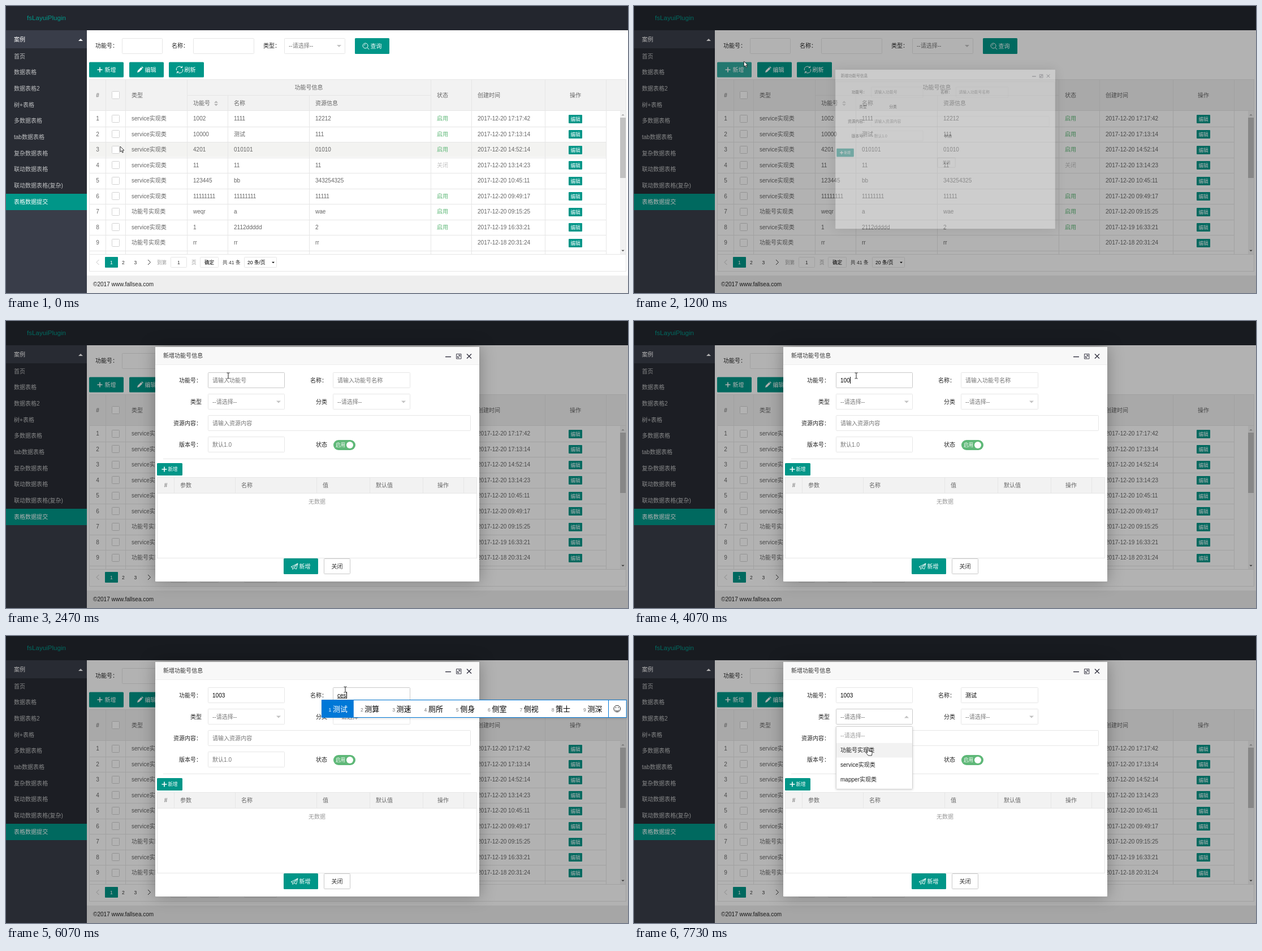
Write an HTML page that moves like this. It is 1100 px wide and 509 px high and loops after 8 s.

```html
<!DOCTYPE html>
<html lang="zh-CN">
<head>
<meta charset="utf-8">
<title>表格数据提交</title>
<style>
html, body { margin: 0; width: 100%; height: 100%; overflow: hidden; background: #fff; }
svg { display: block; width: 100%; height: 100%; }
text { font-family: "Liberation Sans", "Noto Sans CJK SC", "Noto Sans CJK", sans-serif; white-space: pre; }
.shadow { filter: drop-shadow(0 0 14px rgba(0, 0, 0, .3)); }
.lift { filter: drop-shadow(0 1px 2px rgba(0, 0, 0, .15)); }
</style>
</head>
<body>
<svg id="stage" viewBox="0 0 1100 509" preserveAspectRatio="none"></svg>
<script>
const LOOP = 8000, TEAL = '#009688', LINE = '#e6e6e6', HINT = '#757575', BASE = 10.04, SMALL = 8.6;

// ---- drawing helpers, all returning SVG markup ----
const text = (x, y, s, fill = '#666', size = BASE, anchor = 'start', extra = '') =>
  `<text x="${x}" y="${y + size * .36}" fill="${fill}" font-size="${size}" text-anchor="${anchor}" ${extra}>${s}</text>`;
const mid = (x, y, s, fill, size) => text(x, y, s, fill, size, 'middle');
const rect = (x, y, w, h, fill, r = 0, extra = '') =>
  `<rect x="${x}" y="${y}" width="${w}" height="${h}" rx="${r}" fill="${fill}" ${extra}/>`;
const box = (x, y, w, h, stroke = LINE, r = 1, extra = '') =>
  rect(x + .5, y + .5, w - 1, h - 1, '#fff', r, `stroke="${stroke}" ${extra}`);
const hline = (x1, x2, y, c = LINE) => rect(x1, y, x2 - x1, 1, c);
const vline = (x, y1, y2, c = LINE) => rect(x, y1, 1, y2 - y1, c);
const path = (d, stroke, width = 1, fill = 'none') =>
  `<path d="${d}" fill="${fill}" stroke="${stroke}" stroke-width="${width}"/>`;
const fillPath = (d, fill) => `<path d="${d}" fill="${fill}"/>`;
const group = (id, body, extra = '') => `<g id="${id}" ${extra}>${body}</g>`;
const down = (x, y, w = 4, c = '#c2c2c2') => fillPath(`M${x - w} ${y - w / 2}h${2 * w}l${-w} ${w}z`, c);
const up = (x, y, w = 4, c = '#c2c2c2') => fillPath(`M${x - w} ${y + w / 2}h${2 * w}l${-w} ${-w}z`, c);

const icons = {
  plus: (x, y, r = 4.5) => path(`M${x - r} ${y}h${2 * r}M${x} ${y - r}v${2 * r}`, '#fff', 1.6),
  pencil: (x, y) => fillPath(`M${x - 5} ${y + 5}l1-3.4 5.8-5.8 2.4 2.4-5.8 5.8zM${x + 2.5} ${y - 4.8}l1-1 2.4 2.4-1 1z`, '#fff'),
  refresh: (x, y) => path(`M${x - 5.5} ${y + 1}a5.5 5.5 0 0 1 9.5-5M${x + 5.5} ${y - 1}a5.5 5.5 0 0 1-9.5 5M${x + 1.5} ${y - 3.5}h3v-3M${x - 1.5} ${y + 3.5}h-3v3`, '#fff'),
  search: (x, y) => path(`M${x + 4} ${y - .5}a4.5 4.5 0 1 0-9 0a4.5 4.5 0 1 0 9 0M${x + 2.8} ${y + 2.8}l3.4 3.2M${x - 2.5} ${y - 1}a2.3 2.3 0 0 1 2-2`, '#fff'),
  plane: (x, y) => path(`M${x - 6} ${y + 1}l12-6-2.6 10-4-2-2.4 2.6-.4-3.4zM${x - 2.8} ${y + 2.2}l8.8-7.2-6.4 8`, '#fff', .9)
};
const button = (x, y, w, h, label, icon, size = BASE) =>
  rect(x, y, w, h, TEAL, 1.5) + icons[icon](x + (size < BASE ? 13 : 19), y + h / 2) +
  text(x + (size < BASE ? 19.5 : 27.5), y + h / 2, label, '#fff', size);

// ---- page behind the dialog ----
function sidebar() {
  const items = ['首页', '数据表格', '数据表格2', '树+表格', '多数据表格', 'tab数据表格', '复杂数据表格',
    '联动数据表格', '联动数据表格(复杂)', '表格数据提交'];
  return rect(0, 0, 1100, 43, '#23262e') + text(37, 21, 'fsLayuiPlugin', TEAL, 11.6) +
    rect(0, 43, 143, 466, '#393d49') + rect(0, 75, 143, 258, '#282b33') + rect(0, 333, 143, 29, TEAL) +
    text(14, 59, '案例', '#fff') + up(132, 60, 4, '#fff') +
    items.map((s, i) => text(14, 89 + i * 28.67, s, i === 9 ? '#fff' : '#bfc0c2')).join('');
}

function searchBar() {
  return text(158, 70, '功能号：', '#222') + text(293, 70, '名称：', '#222') + text(455, 70, '类型：', '#222') +
    box(205, 57, 72, 28) + box(331, 57, 108, 28) + box(492, 57, 108, 28) +
    text(500, 70.5, '--请选择--', HINT) + down(589, 71) +
    button(617, 57, 61, 28, '查询', 'search') +
    group('addButton', button(147, 99.5, 61, 27, '新增', 'plus')) +
    button(218, 99.5, 61, 27, '编辑', 'pencil') + button(288, 99.5, 62, 27, '刷新', 'refresh');
}

const ROW = 27.5, TOP = 186;
const service = 'service实现类', feature = '功能号实现类';
const rows = [
  [service, '1002', '1111', '12212', '启用', '20 17:17:42'],
  [service, '10000', '测试', '111', '启用', '20 17:13:14'],
  [service, '4201', '010101', '01010', '启用', '20 14:52:14'],
  [service, '11', '11', '11', '关闭', '20 13:14:23'],
  [service, '123445', 'bb', '343254325', '', '20 10:45:11'],
  [service, '11111111', '11111111', '11111', '启用', '20 09:49:17'],
  [feature, 'weqr', 'a', 'wae', '启用', '20 09:15:25'],
  [service, '1', '2112ddddd', '2', '启用', '19 16:33:21'],
  [feature, 'rr', 'rr', 'rr', '', '18 20:31:24']
];

function table() {
  const head = rect(147, 130, 950, 56, '#f2f2f2') + mid(162, 158, '#') + box(187, 151, 14, 14, '#d2d2d2') +
    text(222, 158, '类型') + mid(535.5, 144, '功能号信息') + text(331, 172, '功能号') +
    up(371.5, 170, 3.5, '#b2b2b2') + down(371.5, 175.5, 3.5, '#b2b2b2') +
    text(403, 172, '名称') + text(547, 172, '资源信息') + text(762, 158, '状态') +
    text(834, 158, '创建时间') + mid(1007, 158, '操作');
  const body = rows.map(([type, code, name, source, state, date], i) => {
    const y = TOP + ROW * (i + .5);
    return mid(162, y, i + 1) + box(187, Math.round(y - 7), 14, 14, '#d2d2d2') +
      text(222, y, type) + text(331, y, code) + text(403, y, name) + text(547, y, source) +
      text(762, y, state, state === '启用' ? '#5fb878' : '#c2c2c2') + text(834, y, '2017-12-' + date) +
      rect(995, Math.round(y - 7), 24, 15, TEAL, 1) + mid(1007, y + .7, '编辑', '#fff', SMALL) +
      hline(147, 1061, Math.round(TOP + ROW * (i + 1)));
  }).join('');
  const columns = [176, 211, 320, 751, 823, 953, 1061].map(x => vline(x, 130, 440)).join('') +
    vline(392, 158, 440) + vline(536, 158, 440);
  const scrollbar = rect(1086, 186, 10, 254, '#f1f1f1') + rect(1086, 198, 10, 107, '#c1c1c1') +
    up(1091, 193, 2.6, '#a3a3a3') + down(1091, 434, 2.6, '#505050');
  return head + rect(147, 0, 914, 27, '#f3f3f1', 0, 'id="rowHover"') + body + columns +
    hline(320, 751, 158) + hline(147, 1097, 130) + hline(147, 1097, 185) + scrollbar +
    hline(147, 1097, 440) + hline(147, 1097, 470) + vline(147, 130, 470) + vline(1096, 130, 470);
}

function pager() {
  const y = 454.5, label = (x, s, c = '#333') => text(x, y, s, c, SMALL);
  return path('M164.5 450l-4.5 4.5 4.5 4.5', '#c2c2c2') + rect(175, 445, 23, 19, TEAL, 1) +
    mid(186.5, y, 1, '#fff', SMALL) + mid(207.5, y, 2, '#333', SMALL) + mid(229, y, 3, '#333', SMALL) +
    path('M251 450l4.5 4.5-4.5 4.5', '#333') + label(267, '到第', '#999') + box(291, 445, 29, 19) +
    mid(305.5, y, 1, '#333', SMALL) + label(328, '页', '#999') + box(343, 445, 33, 19) +
    label(351, '确定', '#000') + label(383, '共 41 条') + box(421, 445, 58, 19) +
    label(427, '20 条/页', '#000') + down(472.5, 455, 2.4, '#000') +
    rect(143, 478, 957, 31, '#eee') + text(154, 493, '©2017 www.fallsea.com', '#222');
}

// ---- dialog ----
function dialog() {
  const field = (id, x, y, w) => box(x, y, w, 28, LINE, 1, `id="${id}"`);
  const frame = rect(264, 46, 573, 416, '#fff', 1, 'class="shadow"') + rect(264, 46, 573, 31, '#f8f8f8') +
    hline(264, 837, 77, '#eee') + text(278, 61, '新增功能号信息', '#333') +
    path('M777 63.5h10', '#2e2d3c', 1.4) +
    path('M796.5 58.5h8.5v8.5h-8.5zM798.5 65l4.5-4.5M800 60.5h3v3M798.5 62v3h3', '#2e2d3c', .9) +
    path('M815 58.5l8 8m0-8l-8 8', '#2e2d3c', 1.3);
  const form = text(306, 105, '功能号：', '#222') + field('codeBox', 357, 91, 136) +
    text(365, 105, '请输入功能号', HINT, BASE, 'start', 'id="codeText"') +
    text(538, 105, '名称：', '#222') + field('nameBox', 578, 91, 137) +
    text(586, 105, '请输入功能号名称', HINT, BASE, 'start', 'id="nameText"') +
    text(326, 143, '类型', '#222') + text(296, 181, '资源内容：', '#222') + field('sourceBox', 357, 167, 465) +
    text(365, 181, '请输入资源内容', HINT) + text(306, 219, '版本号：', '#222') + field('versionBox', 357, 205, 136) +
    text(365, 219, '默认1.0', HINT) + text(548, 219, '状态', '#222') +
    button(267, 252, 45, 22, '新增', 'plus', SMALL);
  const early = text(404, 143, '分类', '#222') + box(530, 276, 47, 26, '#c9c9c9') + mid(553.5, 288, '关闭', '#333');
  const columns = [[308, '参数'], [416, '名称'], [560, '值'], [654, '默认值'], [763, '操作']];
  const late = field('typeBox', 357, 129, 136) + text(365, 143, '--请选择--', HINT) +
    group('arrowDown', down(482, 143.5)) + group('arrowUp', up(482, 143.5)) +
    text(548, 143, '分类', '#222') + field('kindBox', 578, 129, 137) + text(586, 143, '--请选择--', HINT) + down(703, 143.5) +
    rect(579, 211, 39, 18, '#5fb878', 9) + text(583, 220, '启用', '#fff', SMALL) +
    '<circle cx="608" cy="220" r="6" fill="#fff"/>' + hline(278, 822, 244) +
    rect(267, 277, 566, 28, '#f2f2f2') + hline(267, 833, 277) + hline(267, 833, 305) + hline(267, 833, 420) +
    vline(267, 277, 420) + vline(832, 277, 420) +
    [297, 405, 549, 643, 737, 809].map(x => vline(x, 277, 305)).join('') +
    mid(282.5, 291, '#') + columns.map(([x, s]) => text(x, 291, s)).join('') + mid(550, 320, '无数据', '#999') +
    button(491, 421, 61, 28, '新增', 'plane') + box(562, 421, 47, 28, '#c9c9c9') + mid(585.5, 435, '关闭', '#333');
  return frame + form + group('early', early) + group('late', late);
}

function dropdown() {
  return box(357, 160, 136, 112, '#d2d2d2', 1, 'class="lift"') +
    rect(358, 190, 134, 25.8, '#f2f2f2', 0, 'id="optionHover"') +
    ['--请选择--', feature, service, 'mapper实现类']
      .map((s, i) => text(365, 176.5 + i * 25.8, s, i ? '#222' : '#999')).join('');
}

// ---- pinyin candidate bars ----
const candidateBars = [
  { from: 5330, to: 5870, x: 588, cell: 43.6, words: '从 出 才 吃 成 车 次 操 长' },
  { from: 5870, to: 6070, x: 593, cell: 43.6, words: '册 测 侧 策 厕 恻 测 冊 側' },
  { from: 6070, to: 6400, x: 558, cell: 56.3, words: '测试 测算 测速 厕所 侧身 侧室 侧视 策士 测深' }
];
function candidateBar({ x, cell, words }, i) {
  const end = x + cell * 9;
  return group('bar' + i, rect(x + .5, 113.5, cell * 9 + 32, 31, '#fff', 0, 'stroke="#0078d7" class="lift"') +
    rect(x, 113, cell + .5, 32, '#0078d7') +
    words.split(' ').map((w, n) => mid(x + 15 + n * cell, 131, n + 1, n ? '#777' : '#fff', SMALL) +
      text(x + 20 + n * cell, 129.5, w, n ? '#000' : '#fff', 13)).join('') +
    vline(Math.round(end), 114, 144, '#0078d7') +
    `<circle cx="${end + 16}" cy="129" r="5.8" fill="none" stroke="#222"/>` +
    path(`M${end + 13} 131a3.2 3.2 0 0 0 6 0M${end + 13.8} 126v2M${end + 18.2} 126v2`, '#222'));
}

const pointers =
  group('arrow', path('M0 0v9.6l2.3-2 1.5 3.5 1.6-.7-1.5-3.4h3z', '#222', .9, '#fff')) +
  group('beam', path('M-2.5-5h2l.5.5.5-.5h2M0-4.5v9M-2.5 5h2l.5-.5.5.5h2', '#222')) +
  group('hand', path('M-1.2 8V.4a1.2 1.2 0 0 1 2.4 0V5l5 1.2q1.2.4 1 2L6.4 13H.4L-3.8 8q.6-1.6 2.6 0', '#222', .9, '#fff'));

const stage = document.getElementById('stage');
stage.innerHTML = rect(0, 0, 1100, 509, '#fff') + sidebar() + searchBar() + table() + pager() +
  rect(0, 0, 1100, 509, '#000', 0, 'id="shade" opacity=".3"') + group('dialog', dialog()) +
  rect(0, 99, 1, 12, '#000', 0, 'id="caret"') + group('dropdown', dropdown()) +
  candidateBars.map(candidateBar).join('') + group('pointer', pointers);

// ---- motion ----
const el = id => document.getElementById(id);
const set = (id, name, value) => el(id).setAttribute(name, value);
const show = (id, on) => set(id, 'display', on ? 'inline' : 'none');
const clamp = v => Math.max(0, Math.min(1, v));

// CSS "ease": cubic-bezier(.25, .1, .25, 1)
function ease(x) {
  x = clamp(x);
  const curve = (s, a, b) => 3 * s * (1 - s) ** 2 * a + 3 * s * s * (1 - s) * b + s ** 3;
  let lo = 0, hi = 1;
  for (let i = 0; i < 20; i++) {
    const s = (lo + hi) / 2;
    if (curve(s, .25, .25) < x) lo = s; else hi = s;
  }
  return curve(lo, .1, 1);
}

const mouse = [[0, 202, 249], [70, 202, 249], [250, 199, 228], [500, 190, 150], [720, 184, 85], [870, 181, 103],
  [1050, 181, 103], [1130, 184, 96], [1200, 194, 98], [1800, 393, 97], [4400, 393, 97], [5000, 600, 95],
  [6330, 600, 95], [7000, 424, 158], [7200, 412, 146], [7300, 412, 146], [7730, 414, 199], [LOOP, 414, 199]];
function mouseAt(t) {
  const i = mouse.findIndex(k => k[0] > t), [t0, x0, y0] = mouse[i - 1], [t1, x1, y1] = mouse[i];
  const p = (t - t0) / (t1 - t0);
  return [x0 + (x1 - x0) * p, y0 + (y1 - y0) * p];
}

const keys = [[1930, 'code', ''], [2600, 'code', '1'], [2800, 'code', '10'], [3000, 'code', '100'], [4130, 'code', '1003'],
  [5200, 'name', ''], [5330, 'name', 'c'], [5870, 'name', 'ce'], [6070, 'name', 'ces'], [6400, 'name', '测试'], [6500, 'name', '测试']];
const hints = { code: '请输入功能号', name: '请输入功能号名称' };
const OPEN = 1133, SELECT = 7300;

function typing(t) {
  const done = keys.filter(k => k[0] <= t), last = done[done.length - 1];
  for (const field of ['code', 'name']) {
    const entry = done.filter(k => k[1] === field).pop(), value = entry ? entry[2] : '';
    el(field + 'Text').textContent = value || hints[field];
    set(field + 'Text', 'fill', value ? '#000' : HINT);
    set(field + 'Text', 'text-decoration', field === 'name' && /^[a-z]+$/.test(value) ? 'underline' : 'none');
  }
  show('caret', last && t < SELECT && (t - last[0]) % 1060 < 530);
  if (last) {
    const width = last[2] ? el(last[1] + 'Text').getComputedTextLength() : 0;
    set('caret', 'x', Math.round((last[1] === 'code' ? 365 : 586) + width));
  }
  return last && t < SELECT ? last[1] : '';
}

function render(t) {
  const [x, y] = mouseAt(t), row = Math.floor((y - TOP) / ROW);
  show('rowHover', t < OPEN && row >= 0);
  set('rowHover', 'y', TOP + ROW * row);
  set('addButton', 'opacity', 1 - .2 * ease((t - 880) / 300) + .2 * ease((t - 1250) / 300));

  const p = ease((t - OPEN) / 300), k = .5 + p / 2;
  show('shade', t >= OPEN);
  show('dialog', t >= OPEN);
  set('dialog', 'opacity', p);
  set('dialog', 'transform', `translate(550.5 254) scale(${k}) translate(-550.5 -254)`);
  show('early', t < 1300);
  show('late', t >= 1300);

  const focus = typing(t), open = t >= SELECT;
  const inside = (left, right) => x > left && x < right && y > 91 && y < 119;
  const overCode = inside(357, 493), overName = inside(578, 715);
  const border = (id, on) => set(id, 'stroke', on ? '#c9c9c9' : LINE);
  border('codeBox', focus === 'code' || overCode);
  border('nameBox', focus === 'name' || overName);
  border('sourceBox', Math.abs(t - 7000) < 120);
  border('typeBox', t > 7100);
  show('arrowDown', !open);
  show('arrowUp', open);

  const q = ease((t - SELECT) / 300), option = Math.floor((y - 164) / 25.8);
  show('dropdown', open);
  set('dropdown', 'opacity', .3 + .7 * q);
  set('dropdown', 'transform', `translate(0 ${21 * (1 - q)})`);
  show('optionHover', option >= 0);
  set('optionHover', 'y', 164 + 25.8 * option);

  candidateBars.forEach((b, i) => show('bar' + i, t >= b.from && t < b.to));

  const beam = t > 6900 && t < 7060 || t > 1250 && (overCode || overName);
  const shape = t >= 7060 ? 'hand' : beam ? 'beam' : 'arrow';
  ['arrow', 'beam', 'hand'].forEach(s => show(s, s === shape));
  set('pointer', 'transform', `translate(${x} ${y})`);
}

const start = performance.now();
function tick() {
  render((performance.now() - start) % LOOP);
  requestAnimationFrame(tick);
}
tick();
</script>
</body>
</html>
```
